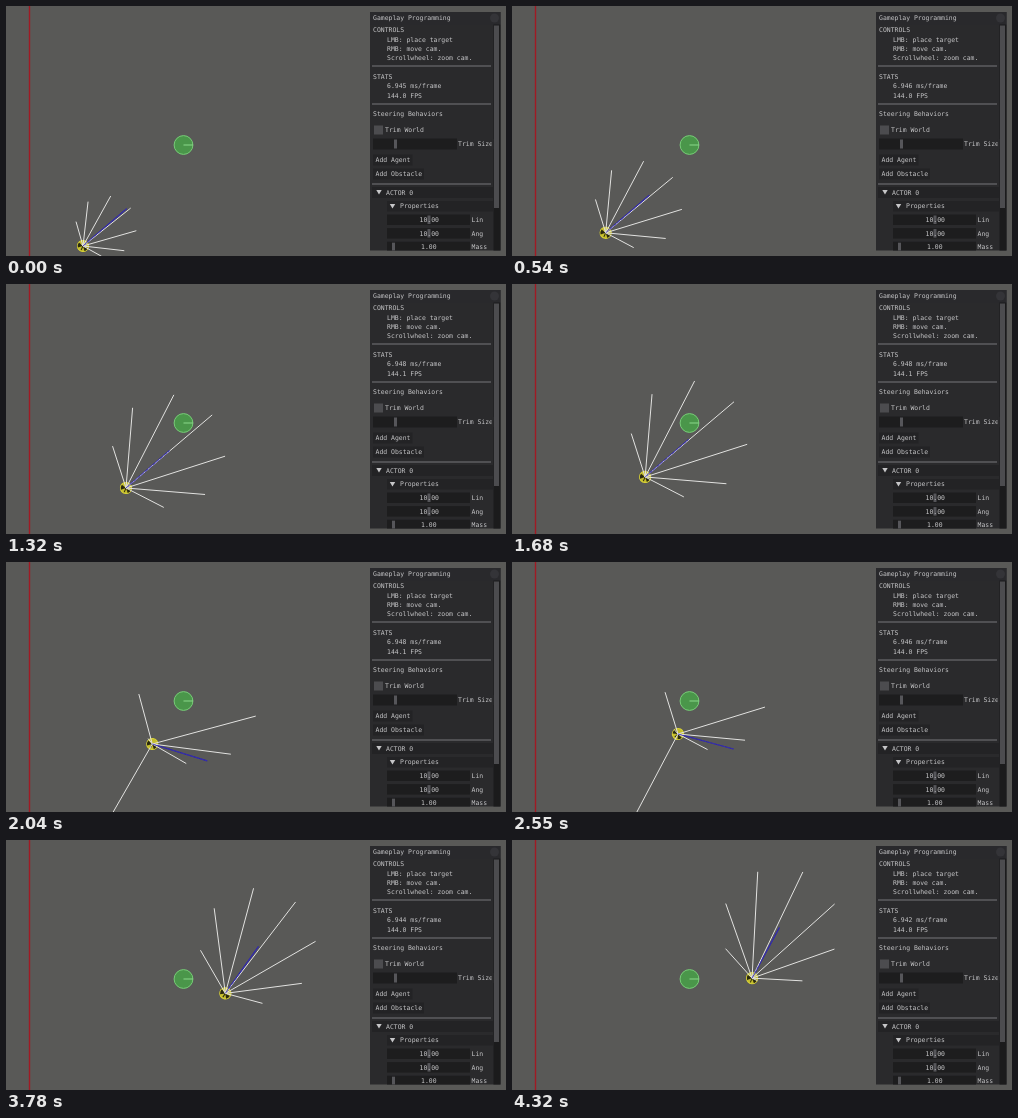
Animation of 500 by 250 pixels, one loop 4350 ms. Source, as an HTML page:

```html
<!DOCTYPE html>
<html lang="en">
<meta charset="utf-8">
<title>Steering Behaviors</title>
<style>
html, body { margin: 0; width: 100%; height: 100%; overflow: hidden; background: #595957; }
svg { display: block; }
text { font: 6.45px "DejaVu Sans Mono", "Liberation Mono", monospace; fill: #c6c6c8; white-space: pre; }
</style>
<svg width="500" height="250" viewBox="0 0 500 250">
  <path d="M23.5 0V250" stroke="#a01a24" stroke-width="1.4"/>
  <circle cx="177.5" cy="139" r="9.4" fill="#4a964a" stroke="#78cc78"/>
  <path d="M177.5 139H187" stroke="#8ad88a"/>
  <g id="agent">
    <circle r="5.6" fill="#c4bd2c" stroke="#d8d236"/>
    <path d="M0 0L-5 -2A5.4 5.4 0 0 1 -1 -5.2ZM0 0L-2 5A5.4 5.4 0 0 0 2.5 4.6Z" fill="#2a2910"/>
    <path d="M-4 2L0 0" stroke="#2a2910"/>
  </g>
  <g fill="none">
    <path id="steer" stroke="#2a22a8" stroke-width="1.2"/>
    <path id="rays" stroke="#e2e2e0"/>
    <path id="dots" stroke="#3a32b0" stroke-dasharray="4 1" opacity=".85"/>
  </g>
  <g id="panel"></g>
</svg>
<script>
const $ = id => document.getElementById(id);
const LOOP = 4350, STEP = 30, RAD = Math.PI / 180;
const target = [278, 68], obstacle = [177.5, 139];

// Panel
let markup = '';
const rect = (x, y, w, h, fill) => markup += `<rect x="${x}" y="${y}" width="${w}" height="${h}" fill="${fill}"/>`;
const label = (x, y, s, id = '') => markup += `<text x="${x}" y="${y}" id="${id}">${s}</text>`;
const rule = y => rect(366, y, 119, 1, '#77777a');
const arrow = (x, y) => markup += `<path d="M${x - 2.7} ${y - 2}h5.4l-2.7 4.6z" fill="#c6c6c8"/>`;
const BODY = '#2a2a2c', FIELD = '#1d1d1e', GRAB = '#56565a', BUTTON = '#232325';

rect(364, 6, 130.5, 238.5, BODY);
rect(364, 6, 130.5, 12.5, '#29292c');
rect(487.5, 18.5, 7, 226, '#1b1b1c');
rect(488, 19.5, 5, 182.5, '#4c4c4f');
markup += '<circle cx="488.5" cy="12" r="4.5" fill="#343438"/>';
label(367, 14.3, 'Gameplay Programming');
label(367, 26.3, 'CONTROLS');
['LMB: place target', 'RMB: move cam.', 'Scrollwheel: zoom cam.'].forEach((s, i) => label(381, 35.8 + i * 9.3, s));
rule(59.5);
label(367, 73.3, 'STATS');
label(381, 82.4, '', 'ms');
label(381, 91.8, '', 'fps');
rule(97.5);
label(367, 110.3, 'Steering Behaviors');
rect(368, 119.5, 9, 9, '#4c4c4f');
label(379, 126.3, 'Trim World');
rect(367, 132.5, 84, 11, FIELD);
rect(388, 133.5, 3, 9, GRAB);
label(452, 140, 'Trim Size');
rect(485.7, 133, 1.8, 10, BODY);
rect(367, 148.5, 39.5, 11, BUTTON);
label(369.5, 156.3, 'Add Agent');
rect(367, 162.5, 51, 11, BUTTON);
label(369.5, 170.2, 'Add Obstacle');
rule(177.5);
rect(366, 181, 121, 11, BUTTON);
arrow(373, 186);
label(380, 188.6, 'ACTOR 0');
rect(381, 195, 106, 10.5, BUTTON);
arrow(386.5, 200);
label(394, 202.3, 'Properties');
[['10.00', 'Lin', 421.5], ['10.00', 'Ang', 421.5], ['1.00', 'Mass', 386]].forEach(([value, name, x], i) => {
  const y = 208.5 + i * 13.6;
  rect(381, y, 83, i < 2 ? 10.5 : 8.8, FIELD);
  rect(x, y + 1, 3, i < 2 ? 8.5 : 7.8, GRAB);
  label(value.length > 4 ? 413.5 : 415, y + 7.5, value);
  label(465.5, y + 7.5, name);
});
$('panel').innerHTML = markup;

// Time, x, y, heading in degrees, ray length
const keys = [
  [0, 77, 240, -38.5, 61], [540, 93.7, 226.8, -39.6, 87], [1320, 120, 204, -40.3, 113],
  [1950, 143, 184.7, -40.2, 119], [2040, 146.3, 182, -37.6, 119], [2550, 166, 172, -17.2, 101],
  [2800, 176.9, 169.3, -11.8, 103], [3240, 196, 164, -18, 113], [4350, 241.1, 137.2, -42.6, 118]
];
const mix = (a, b, u) => a + (b - a) * u;
const angleTo = (x, y, p) => Math.atan2(p[1] - y, p[0] - x);

function pose(t) {
  const i = keys.findIndex((k, n) => n && t <= k[0]);
  const a = keys[i - 1], b = keys[i], u = (t - a[0]) / (b[0] - a[0]);
  const chord = Math.hypot(b[1] - a[1], b[2] - a[2]);
  const hermite = (n, dir) => {
    const s = u * u * (3 - 2 * u);
    return mix(a[n], b[n], s) + chord * (u * (1 - u) ** 2 * dir(a[3] * RAD) - u * u * (1 - u) * dir(b[3] * RAD));
  };
  return { x: hermite(1, Math.cos), y: hermite(2, Math.sin), heading: mix(a[3], b[3], u) * RAD, reach: mix(a[4], b[4], u) };
}

function draw(t) {
  const { x, y, heading, reach } = pose(t);
  const seek = angleTo(x, y, target), gap = Math.PI / 8;
  const near = Math.hypot(obstacle[0] - x, obstacle[1] - y) < 57.5;
  const hit = (Math.round((angleTo(x, y, obstacle) - heading) / gap) + 32) % 16;
  let path = '', sx = 0, sy = 0;
  for (let k = 0; k < 16; k++) {
    const angle = heading + k * gap;
    let size = reach * Math.cos(angle - seek);
    if (size < 1) continue;
    // The blocked ray turns round, its neighbours vanish
    const off = Math.min((k - hit + 16) % 16, (hit - k + 16) % 16);
    if (near && off < 2) size = off || size < 20 ? 0 : -size;
    const dx = size * Math.cos(angle), dy = size * Math.sin(angle);
    sx += dx;
    sy += dy;
    if (size) path += `M${x} ${y}l${dx} ${dy}`;
  }
  const scale = 57.5 / Math.hypot(sx, sy);
  const steer = `M${x} ${y}l${sx * scale} ${sy * scale}`;
  $('rays').setAttribute('d', path);
  $('steer').setAttribute('d', steer);
  $('dots').setAttribute('d', steer);
  $('agent').setAttribute('transform', `translate(${x} ${y}) rotate(${heading / RAD})`);
  const digit = '568867742'[Math.floor(t / 540)];
  $('ms').textContent = `6.94${digit} ms/frame`;
  $('fps').textContent = `144.${digit === '8' ? 1 : 0} FPS`;
}

const start = performance.now();
function tick() {
  const t = (performance.now() - start) % LOOP;
  draw(Math.floor(t / STEP) * STEP);
  requestAnimationFrame(tick);
}
tick();
</script>
</html>
```
